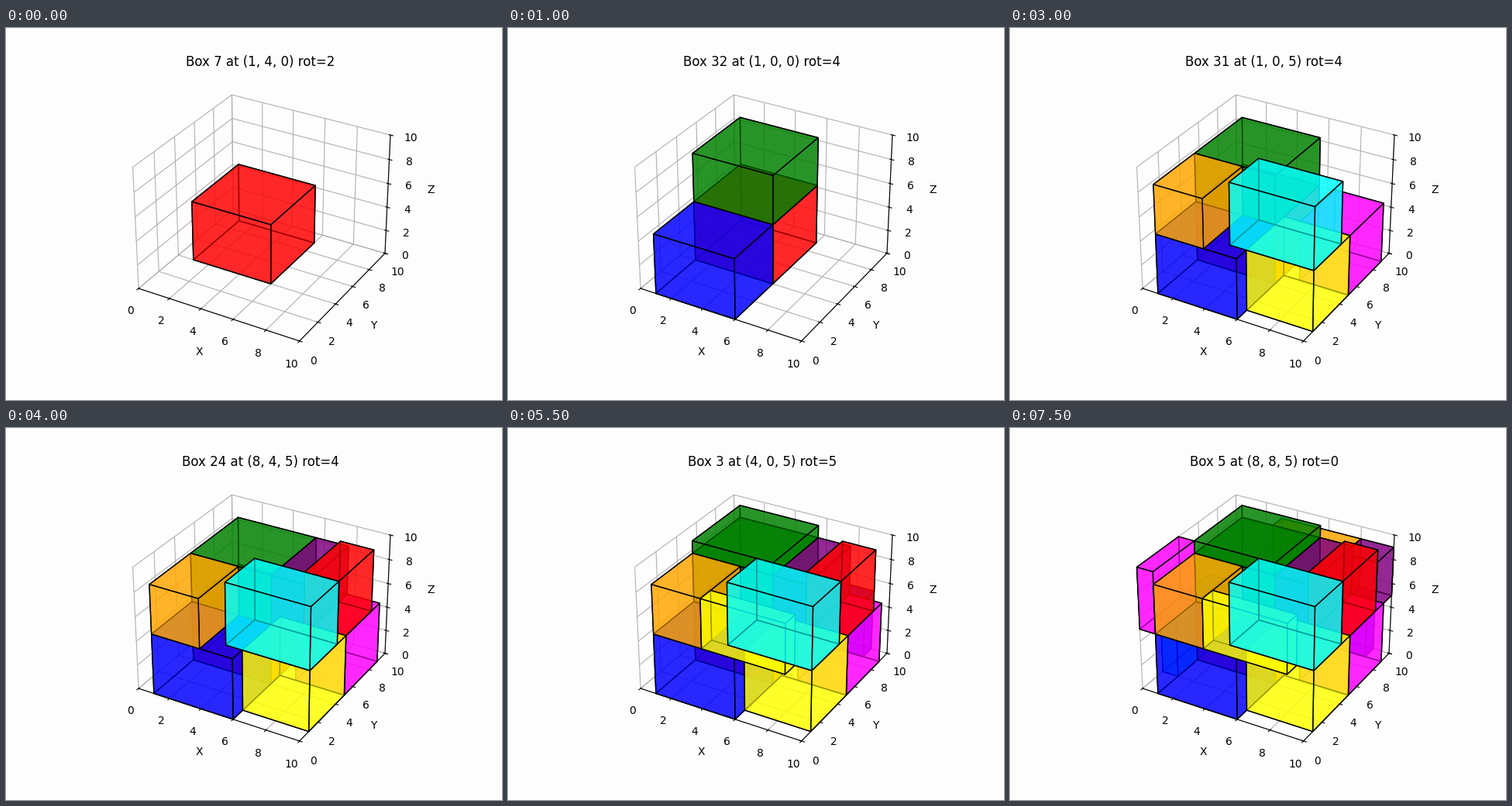
Write a matplotlib script that moves like this. It is 640 px wide and 480 px high and loops after 8 s.

```python
import matplotlib.pyplot as plt
from itertools import cycle, product
from matplotlib.animation import FuncAnimation
from mpl_toolkits.mplot3d.art3d import Poly3DCollection

STEP_MS = 500
PAPER = "#fdfdfd"
COLORS = ["red", "green", "blue", "yellow", "cyan", "magenta", "orange", "purple"]

LEVELS = (5, 9, 10)   # shelf heights the boxes fill up to
TALL = {44, 24, 20}   # ids that reach the top shelf at once
CORE = (1, 4, 5, 5)   # footprint of the central stack

# id, rotation, footprint (x, y, width, depth), in packing order
ITEMS = [
    (7, 2, CORE),
    (12, 2, CORE),
    (32, 4, (1, 0, 5, 4)),
    (18, 3, (6, 1, 4, 4)),
    (44, 1, (5, 1, 5, 3)),
    (41, 5, (7, 5, 3, 4)),
    (31, 4, (1, 0, 3, 4)),
    (27, 0, (6, 4, 2, 5)),
    (24, 4, (8, 4, 2, 4)),
    (16, 1, CORE),
    (38, 3, (4, 9, 5, 1)),
    (3, 5, (4, 0, 5, 1)),
    (9, 2, (0, 2, 1, 5)),
    (20, 4, (0, 0, 1, 4)),
    (49, 3, (3, 9, 5, 1)),
    (5, 0, (8, 8, 2, 2)),
]


def overlaps(a, b):
    """Tell whether two footprints share some floor."""
    return all(a[k] < b[k] + b[k + 2] and b[k] < a[k] + a[k + 2] for k in (0, 1))


def pack(items):
    """Drop each box onto what lies below it; return title, low and high corner."""
    placed, boxes = [], []
    for box_id, rot, foot in items:
        x, y, width, depth = foot
        z = max((top for other, top in placed if overlaps(foot, other)), default=0)
        top = LEVELS[-1] if box_id in TALL else next(v for v in LEVELS if v > z)
        placed.append((foot, top))
        low, high = (x, y, z), (x + width, y + depth, top)
        boxes.append((f"Box {box_id} at {low} rot={rot}", low, high))
    return boxes


def box_faces(low, high):
    """Return the six quads of an axis-aligned box."""
    faces = []
    for axis, side in product(range(3), (0, 1)):
        quad = []
        for a, b in ((0, 0), (1, 0), (1, 1), (0, 1)):
            pick = [a, b]
            pick.insert(axis, side)
            quad.append([h if p else l for l, h, p in zip(low, high, pick)])
        faces.append(quad)
    return faces


fig = plt.figure(figsize=(6.4, 4.8), dpi=100, facecolor=PAPER)
ax = fig.add_subplot(111, projection="3d", facecolor=PAPER)
ax.set(xlim=(0, 10), ylim=(0, 10), zlim=(0, 10),
       xlabel="X", ylabel="Y", zlabel="Z")
for axis in (ax.xaxis, ax.yaxis, ax.zaxis):
    axis.set_pane_color(PAPER)
    axis.pane.set_edgecolor(PAPER)

boxes = pack(ITEMS)
solids = []
for (_, low, high), color in zip(boxes, cycle(COLORS)):
    solid = Poly3DCollection(box_faces(low, high), alpha=0.6, linewidths=1,
                             facecolors=color, edgecolors="black")
    ax.add_collection3d(solid)
    solids.append(solid)


def update(step):
    for i, solid in enumerate(solids):
        solid.set_visible(i <= step)
    ax.set_title(boxes[step][0])
    return solids


anim = FuncAnimation(fig, update, frames=len(boxes), init_func=lambda: update(0),
                     interval=STEP_MS, repeat=True, repeat_delay=0)
plt.show()
```
